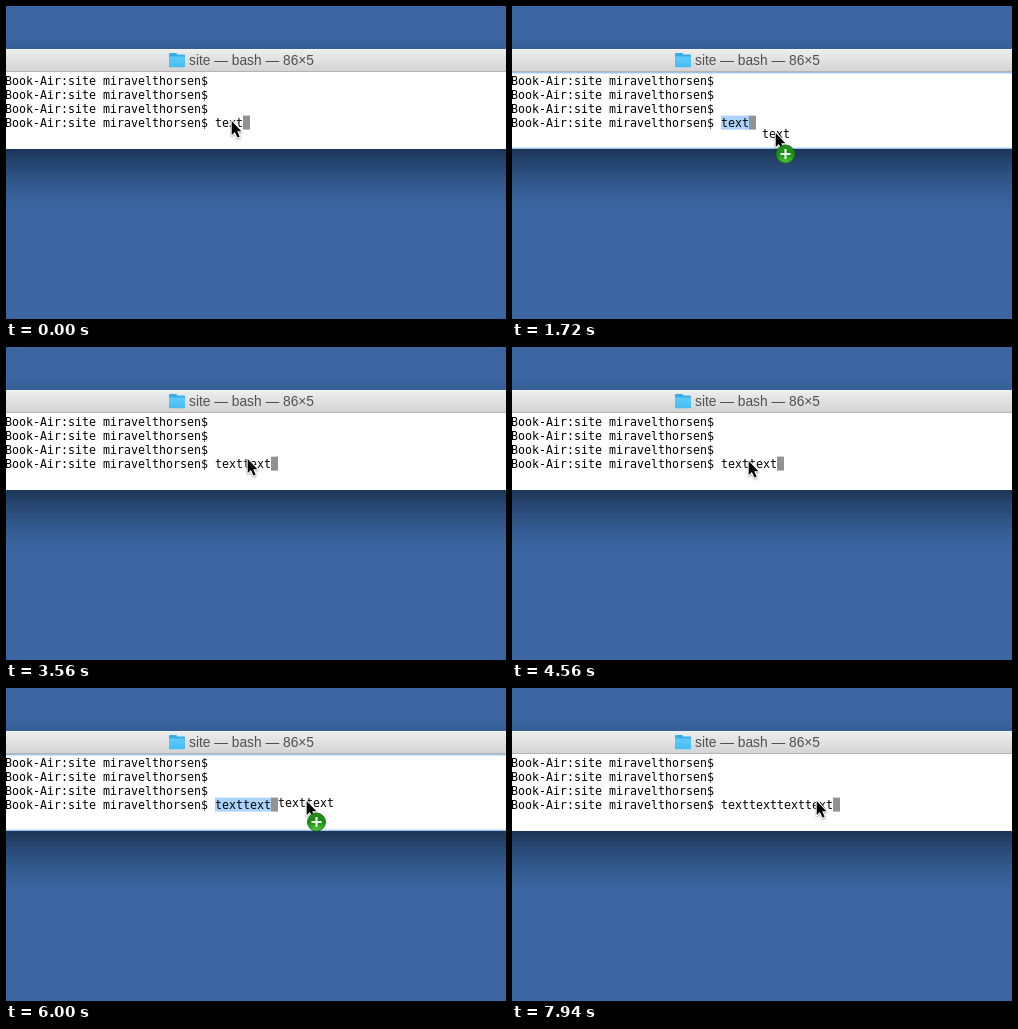
Write an HTML page with a canvas that moves like this. It is 500 px wide and 313 px high and loops after 7960 ms.

```html
<!DOCTYPE html>
<html lang="en">
<head>
<meta charset="utf-8">
<title>Terminal text drag</title>
<style>
html, body { margin: 0; width: 100%; height: 100%; overflow: hidden; background: #3b66a1; }
canvas { display: block; width: 500px; height: 313px; }
</style>
</head>
<body>
<canvas id="stage"></canvas>
<script>
const W = 500, H = 313, LOOP = 7960;
const TOP = 43, BODY = 66, BOTTOM = 143;
const CELL = 7, ROW = 14, INPUT_X = 209, INPUT_Y = 121;
const PROMPT = 'Book-Air:site miravelthorsen$';
const MONO = '11.63px "DejaVu Sans Mono", Menlo, monospace';
const SANS = '13.75px "Liberation Sans", Arial, sans-serif';

// Each cycle selects the typed text, lifts a copy and drops it, doubling the input
const CYCLE = 4000, SELECT = 660, LIFT = 1540, DROP = 2700;

const START = { x: 226, y: 115 };
const MOVES = [
  { at: 300, dur: 400, x: 222, y: 115 },
  { at: LIFT, dur: 200, x: 265, y: 127 },
  { at: 2000, dur: 600, x: 242, y: 112 },
  { at: 4100, dur: 450, x: 237, y: 114 },
  { at: CYCLE + LIFT, dur: 540, x: 305, y: 113 }
];

const canvas = document.getElementById('stage');
const ctx = canvas.getContext('2d');
const dpr = window.devicePixelRatio || 1;
canvas.width = W * dpr;
canvas.height = H * dpr;
ctx.scale(dpr, dpr);

function rect(x, y, w, h, fill) {
  ctx.fillStyle = fill;
  ctx.fillRect(x, y, w, h);
}

function roundRect(x, y, w, h, r, fill) {
  ctx.fillStyle = fill;
  ctx.beginPath();
  ctx.roundRect(x, y, w, h, r);
  ctx.fill();
}

function write(text, x, y, font, color) {
  ctx.font = font;
  ctx.fillStyle = color;
  ctx.fillText(text, x, y);
}

function shade(y0, y1, ...colors) {
  const g = ctx.createLinearGradient(0, y0, 0, y1);
  colors.forEach((c, i) => g.addColorStop(i / (colors.length - 1), c));
  return g;
}

const mono = (text, x, y) => write(text, x, y, MONO, '#000');

function pointerAt(t) {
  let { x, y } = START;
  for (const m of MOVES) {
    const k = Math.min(1, Math.max(0, (t - m.at) / m.dur));
    const ease = k * k * (3 - 2 * k);
    x += (m.x - x) * ease;
    y += (m.y - y) * ease;
  }
  return [Math.round(x), Math.round(y)];
}

function drawShadow() {
  const depth = 62;
  for (let i = 0; i < depth; i++) {
    const alpha = 0.7 * (1 - i / depth) ** 1.5;
    rect(0, BOTTOM + i, W, 1, `rgba(16,34,58,${alpha})`);
  }
  rect(0, TOP - 12, W, 12, shade(TOP - 12, TOP, 'rgba(20,45,85,0)', 'rgba(20,45,85,.14)'));
}

function drawWindow() {
  rect(0, 0, W, H, '#3b66a1');
  drawShadow();
  rect(0, TOP, W, BODY - TOP, shade(TOP, BODY, '#eeeeee', '#d3d3d3'));
  rect(0, TOP, W, 1, '#f4f4f4');
  rect(0, BODY - 1, W, 1, '#b4b4b4');
  rect(0, BODY, W, BOTTOM - BODY, '#fff');
  roundRect(163, 47, 8, 6, 1, '#37ade6');
  roundRect(163, 48.5, 16, 12, 1, '#37ade6');
  roundRect(163, 50.5, 16, 10.7, 1, shade(50, 61, '#62cbfa', '#45bdf4'));
  write('site — bash — 86×5', 183, 59, SANS, '#505050');
}

function drawPointer(x, y) {
  ctx.save();
  ctx.translate(x - 0.3, y);
  ctx.beginPath();
  [[0, 0], [0, 14], [3.2, 11], [5.8, 16.6], [8, 15.7], [5.5, 10.2], [9.7, 10.2]]
    .forEach(p => ctx.lineTo(...p));
  ctx.closePath();
  ctx.lineJoin = 'round';
  ctx.lineWidth = 2;
  ctx.strokeStyle = '#fff';
  ctx.shadowColor = 'rgba(0,0,0,.35)';
  ctx.shadowBlur = 2 * dpr;
  ctx.shadowOffsetY = dpr;
  ctx.stroke();
  ctx.shadowColor = 'transparent';
  ctx.fillStyle = '#000';
  ctx.fill();
  ctx.restore();
}

function drawBadge(x, y) {
  ctx.beginPath();
  ctx.arc(x, y, 9, 0, Math.PI * 2);
  ctx.fillStyle = shade(y - 9, y + 9, '#2b8a20', '#149010', '#52c83c');
  ctx.fill();
  ctx.lineWidth = 1;
  ctx.strokeStyle = '#1d7a17';
  ctx.stroke();
  rect(x - 5, y - 1, 10, 2, '#fff');
  rect(x - 1, y - 5, 2, 10, '#fff');
}

function drawRing() {
  for (const [inset, color] of [[0, '#9cc4ea'], [1, '#d5e8f9']]) {
    rect(0, BODY + inset, W, 1, color);
    rect(0, BOTTOM - 1 - inset, W, 1, color);
  }
}

function draw(t) {
  const cycle = Math.floor(t / CYCLE), local = t % CYCLE;
  const dropped = local >= DROP;
  const selected = local >= SELECT && !dropped;
  const dragging = local >= LIFT && !dropped;
  const text = 'text'.repeat(2 ** (cycle + dropped));
  const width = text.length * CELL;
  const [x, y] = pointerAt(t);

  drawWindow();
  if (dragging) drawRing();
  if (selected) rect(INPUT_X, 109.6, width, ROW, '#acd3fc');
  rect(INPUT_X + width, 109.6, CELL, ROW, '#929292');
  for (let i = 0; i < 4; i++) mono(PROMPT, -1, INPUT_Y - i * ROW);
  mono(text, INPUT_X, INPUT_Y);

  if (dragging) {
    const [gx, gy] = pointerAt(cycle * CYCLE + LIFT);
    mono(text, INPUT_X + x - gx - 1, INPUT_Y + y - gy - 1);
  }
  drawPointer(x, y);
  if (dragging) drawBadge(x + 9.5, y + 21);
}

function tick() {
  draw(performance.now() % LOOP);
  requestAnimationFrame(tick);
}
tick();
</script>
</body>
</html>
```
